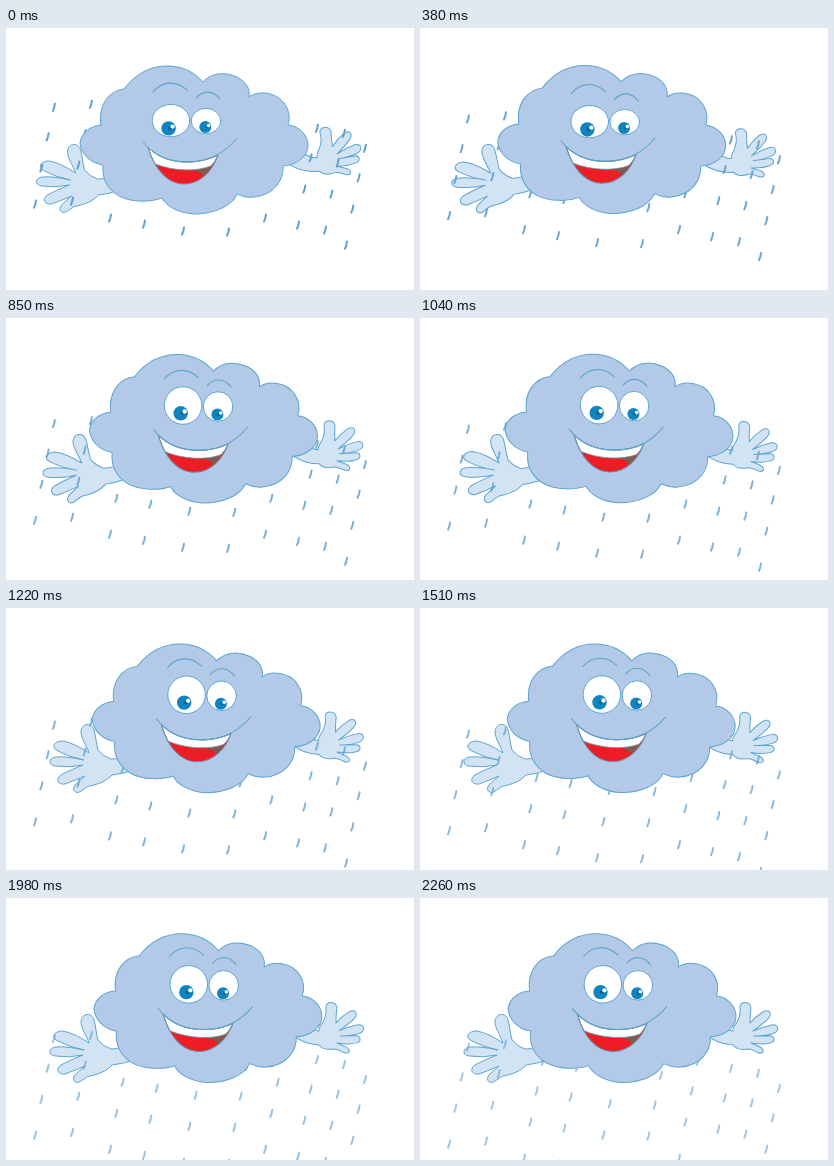
An HTML page with a canvas that plays this animation: 408 by 262 pixels, repeating every 2350 ms.

```html
<!DOCTYPE html>
<html lang="en">
<head>
<meta charset="utf-8">
<title>Rain cloud</title>
<style>
html, body { margin: 0; width: 100%; height: 100%; overflow: hidden; background: #fff; }
canvas { display: block; width: 408px; height: 262px; }
</style>
</head>
<body>
<canvas id="stage"></canvas>
<script>
const W = 408, H = 262, LOOP = 2350, STEPS = 25;
const canvas = document.getElementById('stage');
const ctx = canvas.getContext('2d');
const dpr = window.devicePixelRatio || 1;
canvas.width = W * dpr;
canvas.height = H * dpr;

const LINE = '#5ea4d1', CLOUD = '#b2cae8', SKIN = '#d2e4f3', BLUE = '#0f84be';

const cloud = new Path2D(`M95 97C92 78 102 63 118 61C130 45 145 38 161 38
  C177 38 188 44 197 54C206 44 220 44 231 49C242 55 244 62 243 69
  C252 62 270 64 278 75C284 83 284 90 282 97C294 98 302 108 302 117
  C302 129 290 137 277 138C278 152 268 167 248 169C240 170 236 168 231 166
  C226 178 208 186 188 186C172 185 160 178 156 170C146 174 126 175 113 168
  C100 160 96 150 97 137C84 135 75 126 74 115C75 105 84 98 95 97Z`);

const leftHand = new Path2D(`M128 146C116 150 110 151 105 151Q98 149 92 142
  C90 135 90 129 88 122C86 114 76 115 75 123C75 131 80 136 83 145
  Q68 135 57 133C47 133 45 140 52 143Q63 149 78 152
  Q60 148 50 149C42 150 42 157 49 158Q64 160 77 157
  Q62 163 55 167C49 171 52 177 59 176Q70 172 79 168
  Q73 173 69 177C65 182 70 187 75 183Q82 177 88 177
  Q100 174 106 167Q116 166 128 162Z`);

const rightHand = new Path2D(`M283 134Q296 146 313 147C316 151 322 152 328 151
  C333 151 335 154 339 155C344 156 345 152 340 149Q336 147 331 145
  Q344 147 350 145C356 144 355 138 350 138Q342 138 334 138
  Q345 138 352 136C360 134 359 126 352 127Q342 129 333 133
  Q343 126 348 121C353 115 349 111 343 114Q335 119 330 125
  Q330 117 331 110C330 103 320 103 320 109Q321 117 317 124
  Q312 131 313 133Q306 133 298 124Z`);

const smile = new Path2D('M137 114C148 128 163 134 181 134C203 134 220 124 231 110');
const mouth = new Path2D(`M142 119.5C152 129 165 134 181 134C194 134 204 131 212 127
  C207 142 195 156 178 156C162 156 149 142 142 119.5Z`);
const teeth = new Path2D(`M142 119.5C152 129 165 134 181 134C194 134 204 131 212 127
  Q209 134 205 138C190 144 167 143 149 136Q145 129 142 119.5Z`);
const gap = new Path2D('M184 142Q197 141 206 137Q203 143 198 148Q194 142 184 142Z');
const brows = new Path2D('M147 64C156 53 170 52 181 62M190 70C197 62 207 62 214 71');
const drop = new Path2D('M1 -3.6Q.6 .5 -1 3.6');

// Lowest drop of every column
const COLUMNS = [[29, 176], [66, 173], [104, 190], [138, 196], [177, 203],
  [222, 204], [259, 190], [292, 197], [319, 202], [340, 217]];

const clamp = v => Math.min(1, Math.max(0, v));
const smooth = v => { v = clamp(v); return v * v * (3 - 2 * v); };
const hump = v => Math.sin(Math.PI * clamp(v));

function paint(path, fill, stroke = LINE, width = 1) {
  if (fill) { ctx.fillStyle = fill; ctx.fill(path); }
  if (stroke) { ctx.strokeStyle = stroke; ctx.lineWidth = width; ctx.stroke(path); }
}

function group(draw) {
  ctx.save();
  draw();
  ctx.restore();
}

function turn(x, y, dx, dy, deg) {
  ctx.translate(x + dx, y + dy);
  ctx.rotate(deg * Math.PI / 180);
  ctx.translate(-x, -y);
}

function oval(x, y, rx, ry = rx) {
  const p = new Path2D();
  p.ellipse(x, y, rx, ry, 0, 0, Math.PI * 2);
  return p;
}

// The lower edge of the eye stays put while the upper one opens
function eye(x, y, r, open, px, py, pr) {
  const ry = r * (.86 + .14 * open);
  const ball = oval(x, y + r - ry, r, ry);
  paint(ball, '#fff', null);
  group(() => {
    ctx.clip(ball);
    paint(oval(px, py, pr), BLUE, null);
    paint(oval(px + pr * .2, py, pr * .3), '#0b679c', null);
    paint(oval(px + pr * .55, py - pr * .25, pr * .3), '#fff', null);
  });
  paint(ball, null);
}

function rain(step) {
  ctx.globalAlpha = 1 - step * .017;
  for (const [x, y] of COLUMNS) {
    for (let j = 0; j < 4; j++) {
      group(() => {
        ctx.translate(x + 6.3 * j, y - 36 * j ** .9 + step * 2.92);
        paint(drop, null, '#62a1cf', 2);
      });
    }
  }
  ctx.globalAlpha = 1;
}

function render(step) {
  const u = step / (STEPS - 1);
  const sway = 1 - Math.exp(-((u / .35) ** 1.6));
  const open = smooth((step - 4) / 5);
  const dip = hump(step / 8);
  const reach = clamp(step / 13);

  ctx.setTransform(dpr, 0, 0, dpr, 0, 0);
  ctx.fillStyle = '#fff';
  ctx.fillRect(0, 0, W, H);
  ctx.lineCap = ctx.lineJoin = 'round';

  group(() => {
    turn(82, 151, 13.5 * (reach * reach - 1), 0, -2.5 * hump(reach));
    paint(leftHand, SKIN);
  });
  group(() => {
    const back = 1 - sway;
    turn(330, 136, -1.5 * back, -6.5 * back, -10 * back);
    paint(rightHand, SKIN);
  });

  rain(step);

  group(() => {
    turn(188, 112, 14.2 * sway, -1.5 * sway, 1.5 * sway);
    paint(cloud, CLOUD);
    ctx.translate(1.3 * sway, -.8 * sway);
    paint(mouth, '#ee1c25', null);
    paint(gap, '#80594f', null);
    paint(teeth, '#fff', '#6f8f9c', .8);
    paint(mouth, null, '#5f93ad');
    paint(smile, null);
    ctx.translate(0, 2.3 * dip - 2.6 * sway ** 3);
    paint(brows, null, LINE, 1.1);
  });

  const x = 165 + 18 * sway, y = 90 - 3.7 * sway + 2 * dip;
  eye(x, y, 18.8, open, x - 2.4, y + 10.4 - 2.6 * open, 7.2);
  eye(x + 35, y + 1, 14.8, open, x + 34.3, y + 9, 6);
}

const start = performance.now();
function loop(now) {
  const t = Math.max(0, now - start) % LOOP;
  render(Math.min(STEPS - 1, Math.floor((t + 4) * STEPS / LOOP)));
  requestAnimationFrame(loop);
}
loop(start);
</script>
</body>
</html>
```
